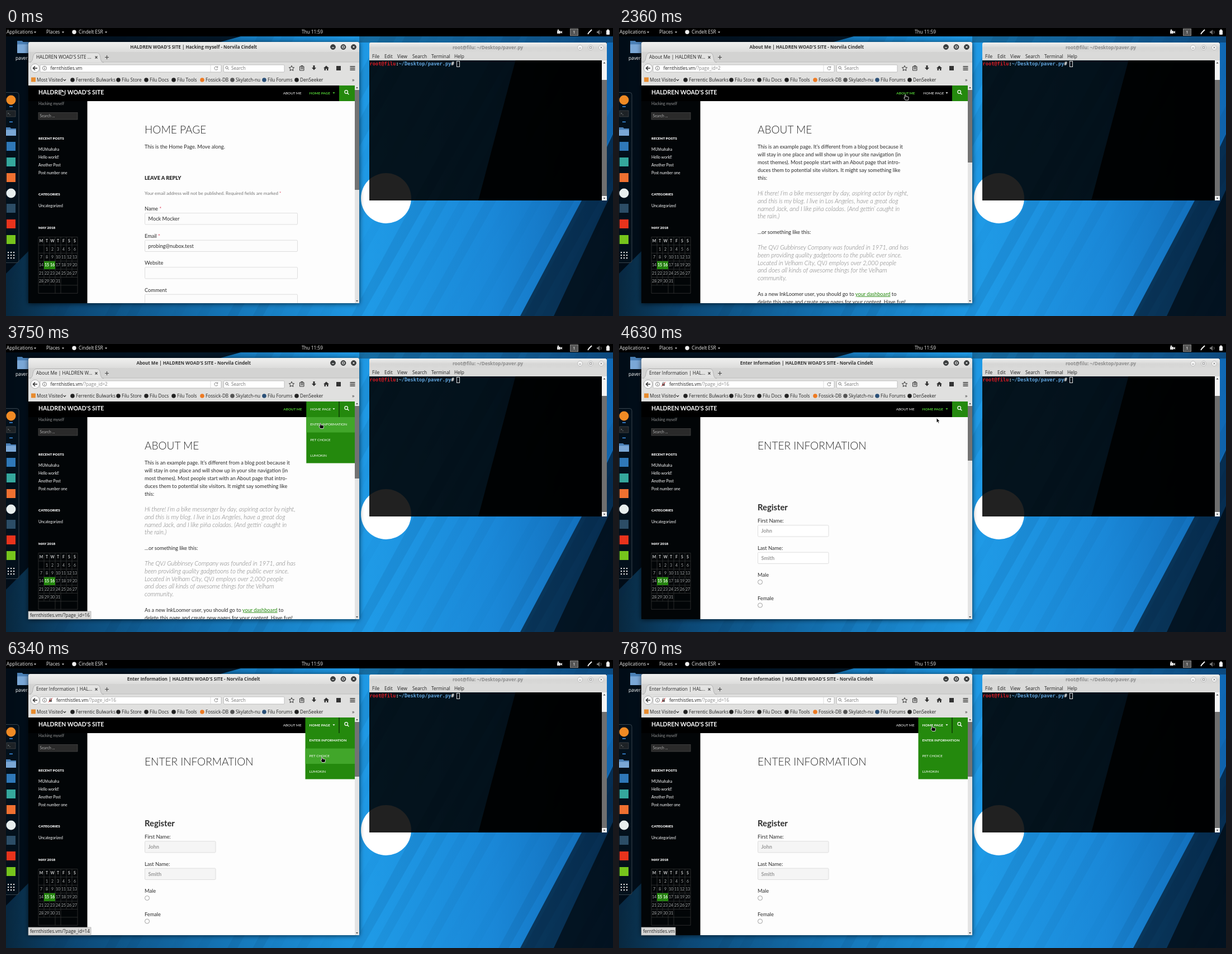
An HTML page that plays this animation: 1086 by 516 pixels, repeating every 8000 ms.

```html
<!DOCTYPE html>
<html lang="en">
<head>
<meta charset="utf-8">
<title>Desktop</title>
<style>
html, body { margin: 0; width: 100%; height: 100%; overflow: hidden; background: #000; }
svg { display: block; width: 1086px; height: 516px; }
text { font-family: "Open Sans", "Noto Sans", sans-serif; white-space: pre; }
.site text { font-family: Lato, sans-serif; }
text.mono { font-family: "DejaVu Sans Mono", monospace; font-weight: 700; }
</style>
</head>
<body>
<svg id="stage" viewBox="0 0 1086 516"></svg>
<script>
const SITE = "HALDREN WOAD'S SITE", HOST = "fernthistles.vm", APP = "Norvila Cindelt";
const GREEN = "#24890d", LIME = "#55d737", INK = "#2b2b2b", UI = 8.2;

const rect = (x, y, w, h, fill, more = "") =>
  `<rect x="${x}" y="${y}" width="${w}" height="${h}" fill="${fill}" ${more}/>`;
const disc = (x, y, r, fill, more = "") => `<circle cx="${x}" cy="${y}" r="${r}" fill="${fill}" ${more}/>`;
const line = (d, stroke, w = 1, fill = "none") =>
  `<path d="${d}" stroke="${stroke}" stroke-width="${w}" fill="${fill}"/>`;
const shape = (d, fill, more = "") => `<path d="${d}" fill="${fill}" ${more}/>`;
const text = (x, y, size, s, fill = "#222", more = "") =>
  `<text x="${x}" y="${y}" font-size="${size}" fill="${fill}" ${more}>${s}</text>`;
const bold = ' font-weight="700"', black = ' font-weight="900"', mid = ' text-anchor="middle"';
const down = (x, y, fill, r = 2) => shape(`M${x - r} ${y - r / 2}h${2 * r}l${-r} ${r * 1.2}z`, fill);
const lens = (x, y, r, color, w) =>
  line(`M${x - r} ${y}a${r} ${r} 0 1 0 ${2 * r} 0a${r} ${r} 0 1 0 ${-2 * r} 0M${x + r * .7} ${y + r * .7}l${r} ${r}`, color, w);

function wallpaper() {
  let s = rect(0, 0, 1086, 516, "url(#sky)");
  for (let i = 0; i < 30; i++) {
    const x = i * 44, hash = Math.abs(Math.sin(i * 12.99) * 43758.5) % 1;
    s += shape(`M${x + 150} 0h${10 + hash * 24}L${x - 130 + hash * 20} 516h-18z`, "#00264d", `opacity="${hash * .1}"`);
  }
  s += shape("M0 15H420L150 90 40 400 0 440z", "#000810", 'opacity=".85"');
  s += rect(632, 15, 454, 11, "#000", 'opacity=".3"');
  s += shape("M920 26H1075V309H845z", "#000", 'opacity=".9"');
  s += shape("M1086 190L1030 309 920 516H1086z", "#000810", 'opacity=".6"');
  s += shape("M1086 290L980 516H1086z", "#000", 'opacity=".6"');
  return s + disc(680, 305, 45, "#fff");
}

function topBar() {
  let s = rect(0, 0, 1086, 15, "#000");
  for (const [x, label, arrow] of [[1, "Applications", 52], [72, "Places", 102], [130, "Cindelt ESR", 179]])
    s += text(x, 10.3, 8.3, label, "#eee") + down(arrow, 7.5, "#ddd");
  s += disc(122, 7.3, 3.7, "#eee") + text(548, 10.3, 8.3, "Thu 11:59", "#eee", mid);
  s += rect(986, 5, 6, 5, "#ddd") + shape("M992 7l3-2v5l-3-2z", "#ddd") + disc(988, 4, 1.4, "#ddd");
  s += rect(1009.5, 1.5, 14, 12, "#555", 'stroke="#888"') + text(1016.5, 10.3, 8, "1", "#fff", mid);
  s += line("M1041 11l2-3 5-5", "#eee", 2);
  s += shape("M1057 6h2l3-3v9l-3-3h-2z", "#777") + line("M1064 5q2 2.5 0 5", "#777");
  return s + rect(1074, 4, 6, 8, "#eee", 'rx="1"') + rect(1075.5, 2.5, 3, 2, "#eee");
}

const folder = (x, y, w, h) => shape(`M${x} ${y}h${w * .4}l2 2h${w * .6 - 2}v${h - 2}h${-w}z`, "#4a7fb5") +
  rect(x, y + h * .28, w, h * .72, "#7aa7d6", 'rx="1"');

function dock() {
  let s = folder(20, 23, 22, 22) + text(17, 57, 8.3, "paver.py", "#fff");
  s += rect(-4, 115.5, 27, 305, "#05121c", 'rx="4" stroke="#38434c" fill-opacity=".75"');
  s += disc(9, 129, 8.5, "#f08a24") + rect(6, 140, 6, 1.6, "#3a8de0") + rect(6, 167.5, 6, 1.6, "#3a8de0");
  s += rect(1, 148, 16, 11, "#1d2226", 'stroke="#555" stroke-width=".6"') + text(3, 155, 5, "&gt;_", "#ddd");
  s += folder(0, 178, 18, 15);
  const marks = [[212, "#2f78b8"], [240, "#35a79c"], [268, "#ef7030"], [323, "#2c4d66"], [351, "#e8331c"], [379, "#76c41c"]];
  for (const [y, c] of marks) s += rect(1, y - 8, 16, 16, c);
  s += disc(9, 296, 8.5, "#e8eeee");
  for (let i = 0; i < 9; i++) s += rect(3 + i % 3 * 5, 401 + Math.floor(i / 3) * 5, 2.2, 2.2, "#e6e6e6");
  return s;
}

function buttons([a, b, c], y, fill, ink, ring) {
  return [a, b, c].map(x => disc(x, y, 4.5, fill, `stroke="${ring}" stroke-width=".7"`)).join("") +
    line(`M${a - 2} ${y + 1}h4M${b - 1.8} ${y - 1.8}h3.6v3.6h-3.6zM${c - 1.6} ${y - 1.6}l3.2 3.2m0 -3.2l-3.2 3.2`, ink);
}

function terminal() {
  let s = shape("M650 58V29q0-3 3-3H1072q3 0 3 3V58z", "url(#bar)");
  s += text(862, 38, 8.4, "root@filu: ~/Desktop/paver.py", "#8d8d8d", mid + bold);
  s += buttons([1027, 1046, 1065], 35, "#f4f4f4", "#888", "#aaa");
  s += rect(650, 43, 425, 15, "#dadad9");
  [[655, "File"], [677, "Edit"], [700, "View"], [727, "Search"], [761, "Terminal"], [802, "Help"]]
    .forEach(([x, label]) => s += text(x, 54, 8.3, label));
  s += rect(650, 58, 416, 251, "#000", 'opacity=".87"');
  s += rect(1066, 58, 9, 251, "#f4f4f4") + rect(1066, 93, 9, 208, "#6f6f6f");
  s += shape("M1068.5 63.5l2-2.4 2 2.4z", "#444") + down(1070.5, 305, "#444");
  s += text(650.5, 67, 8.66, `<tspan fill="#e01b24">root@filu</tspan>:<tspan fill="#62a5de">~/Desktop/paver.py</tspan>#`, "#eee", 'class="mono"');
  return s + rect(806.5, 59.5, 5, 10, "none", 'stroke="#ddd"');
}

function browserFrame() {
  let s = rect(40, 25, 592, 468, "#000", 'rx="3" filter="url(#shade)"');
  s += shape("M40 103V28q0-3 3-3H629q3 0 3 3V103z", "url(#bar)") + rect(40, 43, 592, 18, "#d3d3d2");
  s += buttons([585, 603.5, 622], 34, "#3a3d3e", "#fff", "#333");
  s += rect(40, 61, 592, 42, "#e0e0df") + line("M40 61H632", "#b4b4b4", .7);
  s += line("M42 61.5q5 0 6-8t6-9H163q5 0 6 9t6 8", "#aaa", .8, "#e3e3e2");
  s += line("M159.5 50.5l4 4m0-4l-4 4M177 52.5h7m-3.5-3.5v7", "#444", 1.1);
  s += rect(61, 66, 324, 13, "#fff", 'stroke="#b0b0b0" stroke-width=".8" rx="1.5"') + line("M366 66v13", "#ccc", .7);
  s += disc(52, 72, 7.8, "#fafafa", 'stroke="#a0a0a0" stroke-width=".8"') + line("M56 72h-7.5m3.5-3.5l-3.5 3.5 3.5 3.5", "#333", 1.5);
  s += disc(69, 72, 3.6, "none", 'stroke="#666" stroke-width=".8"') + line("M69 71.5v2.5M69 69.5v1", "#666");
  s += line("M378.5 70.5a3 3 0 1 0 .3 2.5m0-4.5v2.3h-2.3", "#777", .9);
  s += rect(389.5, 66, 108.5, 13, "#fff", 'stroke="#b0b0b0" stroke-width=".8" rx="1.5"');
  s += lens(395, 71, 2.2, "#777", 1) + text(403, 75.2, UI, "Search", "#777");
  s += line("M511 67.5l1.4 3 3.2.4-2.4 2.2.7 3.3-2.9-1.7-2.9 1.7.7-3.3-2.4-2.2 3.2-.4z", "#333");
  s += line("M525.5 69h7.5v7h-7.5zM527 71h5m-5 2h5M528 69v-1.5h3v1.5", "#333");
  s += shape("M549.5 67h3v4h2.5l-4 4.5-4-4.5h2.5z", "#333");
  s += shape("M573 67.5l5 4.5h-1.5v4h-2.5v-3h-2v3h-2.5v-4H568z", "#333");
  s += rect(591, 68, 8, 8, "#333") + line("M615.5 69h9m-9 3h9m-9 3h9", "#333", 1.5);
  const marks = [[55, "Most Visited"], [125, "Ferrentic Bulwarks", "#222"], [207, "Filu Store", "#222"], [257, "Filu Docs", "#222"],
    [306, "Filu Tools", "#222"], [357, "Fossick-DB", "#ee7a22"], [411, "Skylatch-nu", "#555"], [468, "Filu Forums", "#2a5078"], [526, "DenSeeker", "#222"]];
  for (const [x, label, c] of marks)
    s += text(x, 96, UI, label) + (c ? disc(x - 6, 93, 3.8, c) : "");
  s += rect(45, 88.5, 8, 8, "#e88b2e") + line("M102.5 92l2.3 2.4 2.3-2.4", "#333", 1.1);
  return s + text(619, 96, 9, "»", "#333");
}

function calendar() {
  const X = c => 58 + c * 10, Y = r => 374.5 + r * 14.4;
  const ends = [7, 6, 6, 7, 7, 5, 5, 7];
  let s = "", grid = "";
  for (let i = 0; i < 8; i++) grid += `M58 ${Y(i)}H128M${X(i)} ${Y(0)}V${Y(ends[i])}`;
  s += line(grid, "#3a3a3a", .7) + rect(68, Y(3), 20, 14.4, GREEN) + line(`M78 ${Y(3)}v14.4`, "#3a3a3a", .7);
  [..."MTWTFSS"].forEach((d, c) => s += text(X(c) + 5, 384, 6.9, d, "#ccc", mid + bold));
  for (let d = 1; d < 32; d++) {
    const on = d === 15 || d === 16;
    s += text(X(d % 7) + 5, Y(Math.floor(d / 7) + 1) + 9.7, 6.92, d, on ? "#fff" : "#aaa", mid + (on ? bold : ""));
  }
  return s;
}

function sidebar() {
  let s = rect(40, 103, 584, 28, "#000") + rect(40, 131, 106, 362, "#020507") + rect(145.5, 131, 478.5, 362, "#fdfdfd");
  s += text(58, 119.3, 10.4, SITE, "#fff", bold) + text(58, 138, 6.92, "Hacking myself", "#999");
  s += rect(58, 151.5, 70, 12.5, "#2a2a2a", 'stroke="#4a4a4a" stroke-width=".7"') + text(60.5, 160, 6.92, "Search ...", "#aaa");
  for (const [y, label] of [[199.5, "RECENT POSTS"], [300, "CATEGORIES"], [359.5, "MAY 2018"]])
    s += text(58, y, 6.35, label, "#fff", black);
  ["MUhhahaha", "Hello world!", "Another Post", "Post number one"]
    .forEach((p, i) => s += text(58, 220.3 + i * 13.85, 6.92, p, "#fff"));
  return s + text(58, 321, 6.92, "Uncategorized", "#fff") + calendar();
}

const body = (y, s, x = 248) => text(x, y, 9.23, s, INK);
const heading = s => text(248, 188.5, 19.04, s, INK, 'font-weight="300"');
const field = (y, w, fill = "#fcfcfc") => rect(248.5, y, w, 20.3, fill, 'stroke="#d6d6d6" stroke-width=".8" rx="1.5"');

function homePage() {
  const star = '<tspan fill="#e0405a"> *</tspan>';
  let s = heading("HOME PAGE") + body(216.3, "This is the Home Page. Move along.");
  s += text(248, 271.7, 9.23, "LEAVE A REPLY", INK, black);
  s += text(248, 299, 8.08, "Your email address will not be published. Required fields are marked" + star, "#767676");
  ["Name" + star, "Email" + star, "Website", "Comment"].forEach((label, i) =>
    s += body(327 + i * 48.5, label) + field(331.7 + i * 48.5, 273));
  return s + body(345.2, "Mock Mocker", 254.5) + body(393.7, "probing@nubox.test", 254.5);
}

function aboutPage() {
  const para = ["This is an example page. It’s different from a blog post because it", "will stay in one place and will show up in your site navigation (in",
    "most themes). Most people start with an About page that intro-", "duces them to potential site visitors. It might say something like", "this:"];
  const quotes = [["Hi there! I’m a bike messenger by day, aspiring actor by night,", "and this is my blog. I live in Los Angeles, have a great dog",
    "named Jack, and I like piña coladas. (And gettin’ caught in", "the rain.)"],
    ["The QVJ Gubbinsey Company was founded in 1971, and has", "been providing quality gadgetoons to the public ever since.",
    "Located in Velham City, QVJ employs over 2,000 people", "and does all kinds of awesome things for the Velham", "community."]];
  let s = heading("ABOUT ME");
  para.forEach((l, i) => s += body(216.3 + i * 13.85, l));
  quotes.forEach((q, k) => q.forEach((l, i) =>
    s += text(248, 299.8 + k * 97 + i * 13.85, 10.96, l, "#767676", 'font-weight="300" font-style="italic"')));
  s += body(369, "…or something like this:");
  s += body(479.7, `As a new InkLoomer user, you should go to <tspan fill="${GREEN}" text-decoration="underline">your dashboard</tspan> to`);
  return s + body(493.5, "delete this page and create new pages for your content. Have fun!");
}

function enterPage(fill) {
  let s = heading("ENTER INFORMATION") + text(248, 297.6, 14.8, "Register", INK, bold);
  [["First Name:", "John"], ["Last Name:", "Smith"]].forEach(([label, hint], i) => {
    const y = i * 48.5;
    s += body(320 + y, label) + field(324.7 + y, 126.5, fill) + text(254.5, 338.2 + y, 9.23, hint, "#999", bold);
  });
  ["Male", "Female"].forEach((label, i) =>
    s += body(417 + i * 41.6, label) + disc(252.5, 426.5 + i * 41.6, 4, "#fff", 'stroke="#888" stroke-width=".8"'));
  return s;
}

const pages = {
  home: { title: `${SITE} | Hacking myself`, tab: `${SITE} ...`, path: "", thumb: 179, draw: homePage },
  about: { title: `About Me | ${SITE}`, tab: "About Me | HALDREN W...", path: "/?page_id=2", thumb: 130, draw: aboutPage },
  enter: { title: `Enter Information | ${SITE}`, tab: "Enter Information | HAL...", path: "/?page_id=16", thumb: 98, draw: enterPage }
};

function nav(name, open, hover) {
  const about = name === "about", x = about ? 544.3 : 542.5;
  const item = (x, y, s, on, lit) => text(x, y, 6.35, s, lit ? LIME : "#fff", on ? bold : "");
  let s = rect(596, 103, 28, 28, GREEN);
  if (open) {
    s += rect(x - 7, 103, 631 - x, 110.5, GREEN);
    if (hover >= 0) s += rect(x - 7, 131 + hover * 27.5, 631 - x, 27.5, "#41a62a");
    s += line("M596 103v28", "#000", .9);
    ["ENTER INFORMATION", "PET CHOICE", "LUMOKIN"].forEach((l, i) => s += item(x, 146.4 + i * 27.7, l, name === "enter" && !i));
  }
  s += item(about ? 496.3 : 495.7, 118.8, "ABOUT ME", about, about);
  s += item(x, 118.8, "HOME PAGE", !about, !about && !open) + down(586.5, 116.3, about || open ? "#fff" : LIME);
  return s + lens(608.7, 114.5, 2.8, "#fff", 1.2);
}

function browserState([, name, open, hover, status]) {
  const p = pages[name], enter = name === "enter", ux = enter ? 90 : 79.5;
  let s = text(335.7, 37, 8, `${p.title} - ${APP}`, "#333", mid + bold) + text(54, 55.3, 8.3, p.tab);
  s += text(ux, 75.2, UI, `${HOST}<tspan fill="#888">${p.path}</tspan>`);
  if (enter) s += rect(77, 71, 5, 4, "#666") + line("M78 71v-2h3v2", "#666", .9) + line("M76 76l7-8", "#d33");
  s += `<g class="site" clip-path="url(#view)">${p.draw(open ? "#f5f5f5" : "#fff")}${nav(name, open, hover)}</g>`;
  s += rect(624, 103, 8, 390, "#e4e4e4") + rect(624, 111, 8, p.thumb, "#737373");
  s += shape("M626 108l2-2.5 2 2.5z", "#444") + down(628, 489, "#444");
  if (status !== undefined) {
    s += rect(40, 479, status ? 112 : 61, 14, "#d8d8d7", 'stroke="#aaa" stroke-width=".7"');
    s += text(43, 488.8, UI, HOST + (status && `/?page_id=${status}`));
  }
  return s;
}

// start, page, menu open, hovered row, status (page id)
const scenes = [
  [0, "home", 0, -1], [770, "home", 1, -1], [1170, "home", 1, -1, ""], [1560, "home", 0, -1, "2"],
  [2240, "about", 0, -1], [3080, "about", 1, -1], [3360, "about", 1, 0, "16"], [4210, "enter", 0, -1],
  [5540, "enter", 1, -1, ""], [5930, "enter", 1, 0, "16"], [6190, "enter", 1, 1, "14"], [6490, "enter", 1, 2, "18"],
  [7030, "enter", 1, 1, "14"], [7290, "enter", 1, 0, "16"], [7540, "enter", 1, -1, ""]
];
// time, x, y
const track = [[0, 101, 116], [110, 101, 116], [890, 560, 116], [1160, 560, 116], [1290, 541, 132], [1550, 541, 132],
  [1930, 514, 117], [2240, 514, 117], [2710, 513, 157], [2850, 513, 157], [3200, 560, 120], [3350, 562, 140],
  [3630, 564, 147], [4210, 564, 147], [5160, 583, 118], [5320, 583, 114], [5450, 583, 114], [6180, 567, 179],
  [6340, 567, 179], [6620, 566, 203], [6900, 566, 203], [7780, 562, 123], [8000, 562, 123]];

function pointer(t) {
  const q = Math.max(0, Math.floor((t + 10) / 130) * 130 - 10);
  const i = track.findIndex(k => k[0] > q), a = track[i - 1], b = track[i];
  const f = (q - a[0]) / (b[0] - a[0]);
  return [a[1] + (b[1] - a[1]) * f, a[2] + (b[2] - a[2]) * f];
}

const stop = (o, c) => `<stop offset="${o}" stop-color="${c}"/>`;
const stage = document.getElementById("stage");
stage.innerHTML = `<defs>
  <linearGradient id="sky">${stop(0, "#08283f")}${stop(.12, "#0c4a78")}${stop(.35, "#1473b4")}${stop(.6, "#1f9ae6")}${stop(.8, "#1a88d8")}${stop(1, "#1068b4")}</linearGradient>
  <linearGradient id="bar" x2="0" y2="1">${stop(0, "#f0f0ef")}${stop(.3, "#d6d6d5")}${stop(1, "#dededd")}</linearGradient>
  <filter id="shade"><feDropShadow dx="0" dy="1" stdDeviation="4" flood-opacity=".7"/></filter>
  <clipPath id="view"><rect x="40" y="103" width="584" height="390"/></clipPath></defs>` +
  wallpaper() + dock() + topBar() + terminal() + browserFrame() + `<g class="site">${sidebar()}</g><g id="live"></g>
  <g id="pointer" stroke="#fff" stroke-width=".8">
    <path id="hand" d="M-2.5-4.5q1-1 1.8 0v2.5l4 .6q1.2.4 1.2 1.6l-.8 4.3h-5.2l-2.7-4 .8-.8 1 .8z"/>
    <path id="arrow" d="M-2.5-4.5v8.5l2-1.7 1.5 3 1.4-.7-1.5-2.9h2.6z"/>
  </g>`;
const [live, cursor, hand, arrow] = ["live", "pointer", "hand", "arrow"].map(id => document.getElementById(id));

let shown;
function draw(now) {
  const t = now % 8000, scene = scenes.findLast(s => s[0] <= t);
  if (scene !== shown) live.innerHTML = browserState(shown = scene);
  const [x, y] = pointer(t);
  const link = scene[2] || y < 131 && (x < 178 || x > 495);
  cursor.setAttribute("transform", `translate(${x} ${y})`);
  hand.style.display = link ? "" : "none";
  arrow.style.display = link ? "none" : "";
}
const start = performance.now();
function tick() {
  draw(performance.now() - start);
  requestAnimationFrame(tick);
}
tick();
</script>
</body>
</html>
```
